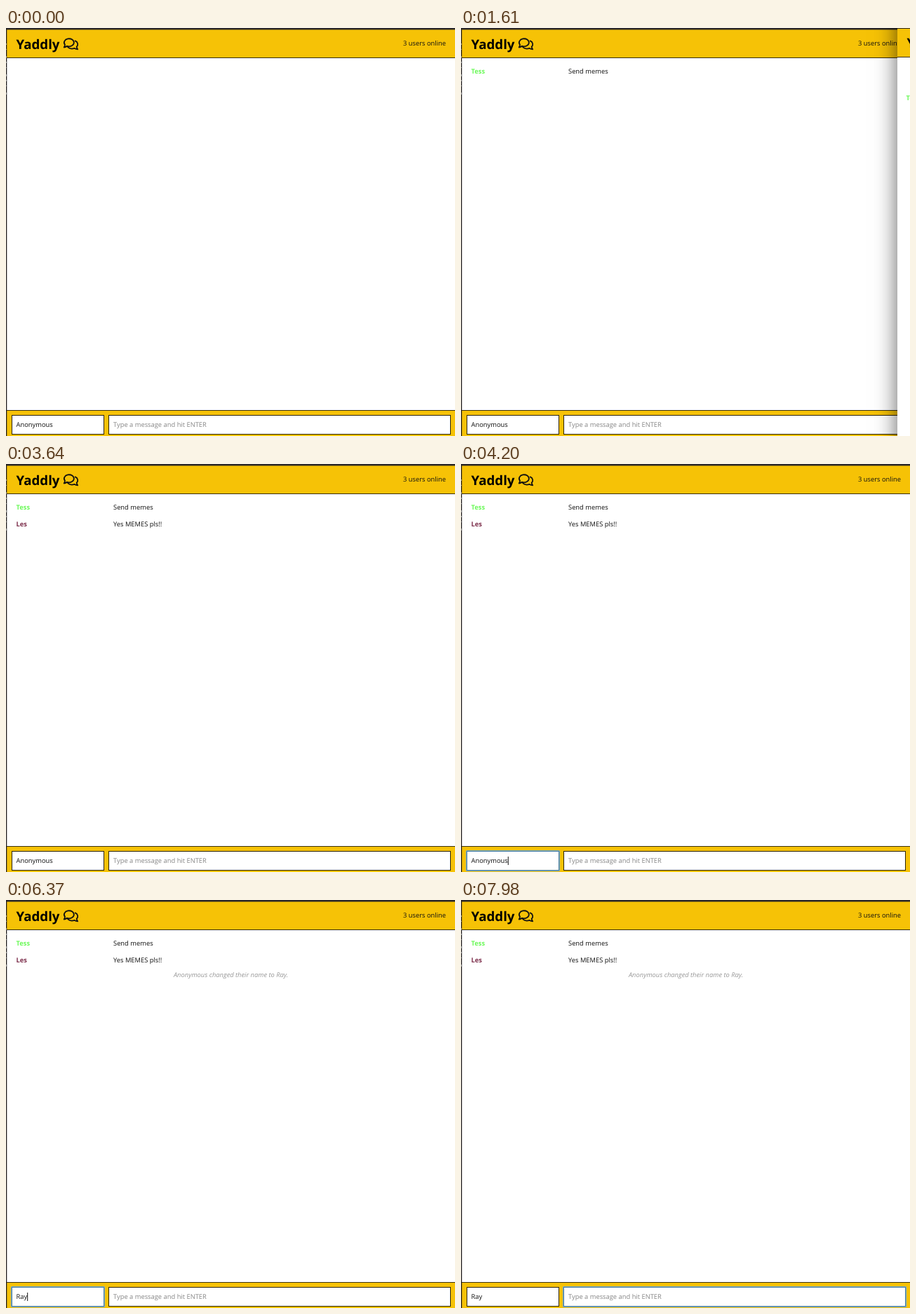
An HTML page for the animation above (8000 ms loop, 640 px wide and 582 px high).

```html
<!DOCTYPE html>
<html lang="en">
<head>
<meta charset="utf-8">
<title>Yaddly</title>
<style>
  html, body { margin: 0; width: 100%; height: 100%; overflow: hidden; background: #fff; }
  #stage { position: relative; width: 640px; height: 582px; overflow: hidden; }
  svg { position: absolute; left: 0; top: 0; }
  text { font: 9.35px "Open Sans", "Noto Sans", sans-serif; fill: #111; white-space: pre; text-rendering: geometricPrecision; }
  .title { font-size: 18.7px; font-weight: 700; fill: #000; }
  .author { font-weight: 700; }
  .notice { font-style: italic; fill: #999; text-anchor: middle; }
  .hint { fill: #868686; }
  .bar { fill: #f6c206; }
  .line { fill: #3a2f0c; }
  .icon { fill: none; stroke: #111; stroke-width: 1.8; stroke-linejoin: round; stroke-linecap: round; }
  .field { fill: #fff; stroke: #2a2308; }
  .ring { fill: none; stroke: #78a9c4; stroke-width: 1.2; opacity: 0; }
  .focused .field { stroke: #4b7d9c; }
  .focused .ring { opacity: 1; }
  /* Taller than the stage so the side shadow stays even */
  #window { position: absolute; left: 622px; top: -50px; width: 100px; height: 682px; background: #fff; }
  #window svg { top: 50px; }
</style>
</head>
<body>
<div id="stage">
  <svg width="640" height="582">
    <rect width="640" height="582" fill="#fff"/>
    <rect class="bar" x="1" y="2" width="639" height="40"/>
    <rect class="line" x="1" y="42" width="639" height="1"/>
    <rect class="bar" x="1" y="546" width="639" height="36"/>
    <rect class="line" x="1" y="545" width="639" height="1"/>
    <rect width="640" height="2.5" fill="#2b2828"/>
    <rect width="1.3" height="582" fill="#252222"/>
    <path d="M.5 22V96" stroke="#888" stroke-dasharray="2 6 1 9 3 5"/>

    <text class="title" x="14.5" y="29.6">Yaddly</text>
    <g class="icon">
      <path d="M84 23.8A7 5.5 0 1 1 87 25.8Q85 27.5 82.7 27.5Q83.9 26 84 23.8Z"/>
      <path d="M98.7 18.4C102.6 20 103.4 24.5 100.7 26.8Q101 29 102.2 30.3Q99.6 30.2 97.8 28.9C94 30.2 90.5 29.6 88.2 27.4"/>
    </g>
    <text x="627" y="25" text-anchor="end">3 users online</text>

    <g data-from="70">
      <text class="author" x="14.5" y="64.5" style="fill:#6cf95a">Tess</text>
      <text x="153" y="64.5">Send memes</text>
    </g>
    <g data-from="1960">
      <text class="author" x="14.5" y="88.5" style="fill:#7d2f4c">Les</text>
      <text x="153" y="88.5">Yes MEMES pls!!</text>
    </g>
    <text class="notice" data-from="6160" x="320.5" y="110.3">Anonymous changed their name to Ray.</text>

    <g id="nameField">
      <rect class="ring" x="7.5" y="551.5" width="133" height="29" rx="1"/>
      <rect class="field" x="8.5" y="552.5" width="131" height="27"/>
      <text id="name" x="14.5" y="569.4"></text>
    </g>
    <g id="messageField">
      <rect class="ring" x="145.5" y="551.5" width="489" height="29" rx="1"/>
      <rect class="field" x="146.5" y="552.5" width="487" height="27"/>
      <text class="hint" x="153" y="569.4">Type a message and hit ENTER</text>
    </g>
    <rect id="caret" y="560" width="1" height="12" fill="#111"/>
  </svg>

  <div id="window">
    <svg width="100" height="582">
      <rect class="bar" y="1" width="100" height="40"/>
      <rect class="line" y="41" width="100" height="1"/>
      <rect width="100" height="1" fill="#2b2828"/>
      <text class="title" x="13.5" y="27.8">Yaddly</text>
      <text class="author" x="12.5" y="102.7" style="fill:#6cf95a">Tess</text>
      <text class="author" data-from="1960" x="12.5" y="126.5" style="fill:#7d2f4c">Les</text>
    </svg>
  </div>
</div>
<script>
  const LOOP = 8000, OLD_NAME = 'Anonymous', NEW_NAME = 'Ray';
  const WINDOW_IN = 910, WINDOW_OUT = 3570;
  const NAME_FOCUS = 3850, ERASE = 4410, ERASE_STEP = 70, MESSAGE_FOCUS = 7480;
  const KEYS = [5110, 5180, 5320];
  // Moments at which the caret starts its blink again
  const BLINK_STARTS = [NAME_FOCUS, ERASE, ERASE + 8 * ERASE_STEP, ...KEYS, MESSAGE_FOCUS];

  const byId = id => document.getElementById(id);
  const clamp = (v, lo, hi) => Math.min(hi, Math.max(lo, v));
  const show = (el, on) => { el.style.visibility = on ? 'inherit' : 'hidden'; };
  const timed = [...document.querySelectorAll('[data-from]')];
  const name = byId('name'), caret = byId('caret'), overlay = byId('window');

  function typedName(t) {
    if (t >= KEYS[0]) return NEW_NAME.slice(0, KEYS.filter(k => k <= t).length);
    const erased = clamp(Math.floor((t - ERASE) / ERASE_STEP) + 1, 0, OLD_NAME.length);
    return OLD_NAME.slice(0, OLD_NAME.length - erased);
  }

  function drawWindow(t) {
    show(overlay, t >= WINDOW_IN && t < WINDOW_OUT);
    const rise = clamp((t - WINDOW_IN) / 210, 0, 1);
    overlay.style.boxShadow = `0 0 ${12 + 18 * rise}px rgba(0,0,0,${0.22 + 0.4 * rise})`;
  }

  function drawFields(t) {
    const inMessage = t >= MESSAGE_FOCUS, inName = t >= NAME_FOCUS && !inMessage;
    byId('nameField').classList.toggle('focused', inName);
    byId('messageField').classList.toggle('focused', inMessage);
    const text = typedName(t);
    if (name.textContent !== text) name.textContent = text;
    const start = BLINK_STARTS.filter(s => s <= t).pop();
    show(caret, start !== undefined && (t - start) % 1000 < 500);
    caret.setAttribute('x', inMessage ? 153 : 14.5 + (text ? name.getComputedTextLength() : 0));
  }

  function frame(now) {
    const t = now % LOOP;
    timed.forEach(el => show(el, t >= +el.dataset.from));
    drawWindow(t);
    drawFields(t);
    requestAnimationFrame(frame);
  }
  frame(0);
</script>
</body>
</html>
```
